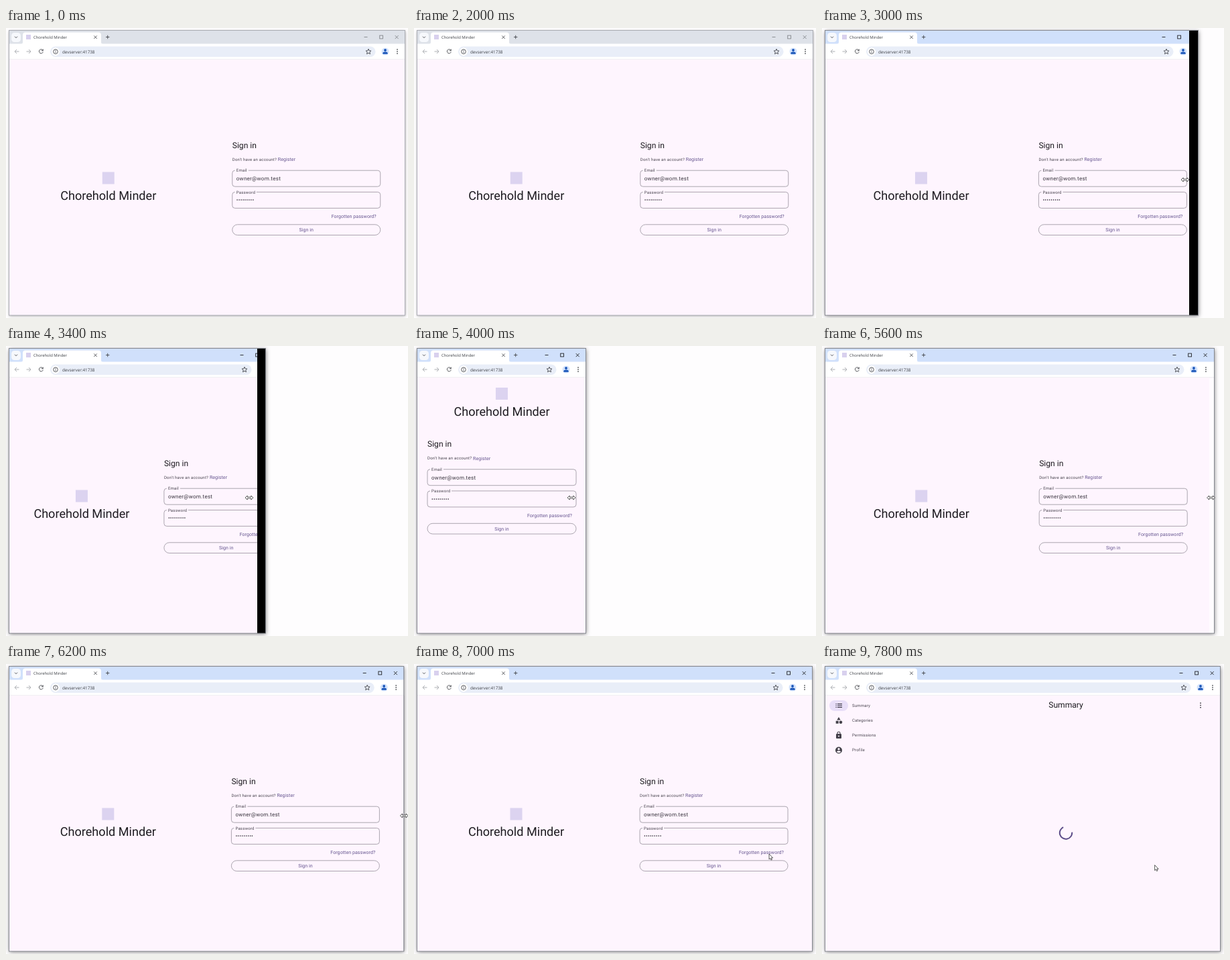
An HTML page that plays this animation: 600 by 432 pixels, repeating every 8000 ms.

```html
<!DOCTYPE html>
<html lang="en">
<head>
<meta charset="utf-8">
<title>Resizable sign-in</title>
<style>
  html, body { margin: 0; width: 100%; height: 100%; overflow: hidden; background: #fefdfe; }
  #stage { display: block; width: 600px; height: 432px; }
  text { font-family: Roboto, sans-serif; fill: #1d1b20; white-space: pre; text-rendering: geometricPrecision; }
  .ui text { font-family: "Open Sans", sans-serif; fill: #3c3f45; }
  .h1 { font-size: 18.1px; text-anchor: middle; }
  .h2 { font-size: 12.1px; }
  .small { font-size: 6.05px; letter-spacing: .2px; fill: #49454f; }
  .input { font-size: 8.06px; letter-spacing: .25px; fill: #3a363f; }
  .link { font-size: 7.06px; letter-spacing: .05px; fill: #65558f; }
  .end { text-anchor: end; }
  .mid { text-anchor: middle; }
  .box { fill: none; stroke: #97929c; stroke-width: .8; }
  .page { fill: #fef5fe; }
  .icon { fill: none; stroke: #44474c; stroke-width: .9; }
  .pale { stroke: #a4a7ac; }
  .solid { fill: #44414a; }
  #shade { filter: drop-shadow(0 1px 3px rgba(0, 0, 0, .5)); }
  #frame { fill: none; stroke: #85888f; stroke-width: 1; }
  #title { fill: #d0e0fb; }
  #sysButtons { stroke: #202124; }
  .idle #title { fill: #dee2e9; }
  .idle #sysButtons { stroke: #83868b; }
  .idle #shade { filter: drop-shadow(0 1px 2px rgba(0, 0, 0, .35)); }
  .idle #frame { stroke: #a9abb2; }
  #button.hover { fill: #f3eaf9; }
  .pointer { fill: #fff; stroke: #333; stroke-width: .8; stroke-linejoin: round; }
</style>
</head>
<body>
<svg id="stage" viewBox="0 0 600 432">
  <rect id="shade" x="5" y="4" height="424"/>
  <svg id="pane" width="600" height="428">
    <rect x="5" y="4" width="600" height="424" fill="#fffcff"/>

    <g class="ui">
      <rect id="title" x="5" y="4" width="600" height="20"/>
      <rect x="8" y="7" width="14" height="14" rx="4.5" fill="#f6f8fc"/>
      <path class="icon" d="M13 12.7l2 2 2-2"/>
      <path d="M22 24q3 0 3-3V10.500q0-4 4-4H138q4 0 4 4V21q0 3 3 3z" fill="#fff"/>
      <rect x="30" y="10" width="7" height="7" fill="#d8d0ee"/>
      <text x="41" y="16" font-size="5.9">Chorehold Minder</text>
      <path class="icon" d="M131.300 11.500l4.400 4.400m0-4.400l-4.400 4.400M149 13.500h5.400M151.700 10.800v5.400"/>
      <rect x="5" y="23.500" width="600" height="23" fill="#fff"/>
      <rect x="5" y="46.500" width="600" height=".8" fill="#e6e3ea"/>
      <path class="icon pale" d="M19.500 35H13m3-3l-3 3 3 3M30.500 35H37m-3-3l3 3-3 3"/>
      <path class="icon" d="M55 33.300a3 3 0 1 0 .3 2.300M55.300 31.500v2.300H53"/>
      <rect id="address" x="66" y="27.500" height="15.500" rx="7.700" fill="#e9eef8"/>
      <circle cx="74" cy="35.200" r="6" fill="#fff"/>
      <circle class="icon" cx="74" cy="35.200" r="3.300" stroke-width=".8"/>
      <path class="icon" d="M74 34.800v2M74 33.100v.9" stroke-width=".8"/>
      <text x="84" y="37.500" font-size="6.3">devserver:41738</text>
      <g id="right">
        <g id="sysButtons" class="icon">
          <path d="M-61.500 13.500h5M-15.300 11.100l5 5m0-5l-5 5"/>
          <rect x="-38.300" y="11.100" width="4.800" height="4.800"/>
        </g>
        <path class="icon" stroke-linejoin="round" d="M-55 31.200l1.100 2.600 2.800.2-2.100 1.900.7 2.800-2.500-1.500-2.500 1.500.7-2.800-2.100-1.900 2.800-.2z"/>
        <circle cx="-30" cy="35" r="5.500" fill="#d3e3fd"/>
        <circle cx="-30" cy="33" r="1.900" fill="#1b56b8"/>
        <path d="M-33.700 38.700v-.8q0-2.300 3.700-2.300t3.700 2.300v.8z" fill="#1b56b8"/>
        <path d="M-12 31.300v7.600" stroke="#3c3f44" stroke-width="1.500" stroke-dasharray="1.500"/>
      </g>
    </g>

    <rect id="page" class="page" x="5" y="47.300" height="381"/>

    <g id="login">
      <g id="brand">
        <rect x="-9" y="214.500" width="18" height="18" fill="#dcd3f0"/>
        <text class="h1" y="256.300">Chorehold Minder</text>
      </g>
      <g id="form">
        <text class="h2" y="178.500">Sign in</text>
        <text class="small" y="197.700">Don't have an account?</text>
        <text class="link" x="68" y="198">Register</text>
        <rect class="box wide" y="212.200" height="24" rx="4"/>
        <rect class="page" x="4" y="211" width="20" height="3"/>
        <text class="small" x="6" y="214.300">Email</text>
        <text class="input" x="6" y="227">owner@wom.test</text>
        <rect class="box wide" y="244.400" height="24" rx="4"/>
        <rect class="page" x="4" y="243" width="32" height="3"/>
        <text class="small" x="6" y="246.500">Password</text>
        <text class="input" x="6" y="259.200">•••••••••</text>
        <text id="forgot" class="link end" y="283.300">Forgotten password?</text>
        <rect id="button" class="box wide" y="292.800" height="15.700" rx="7.850"/>
        <text id="submit" class="link mid" y="303.200">Sign in</text>
      </g>
      <g id="stale">
        <path class="box" d="M0 212.200h6M0 236.200h6M0 244.400h6M0 268.400h6M0 292.800h6M0 308.500h6"/>
        <text class="link" x="1" y="283.300">w</text>
      </g>
    </g>

    <g id="home">
      <rect x="11" y="54" width="28" height="16" rx="8" fill="#e8def8"/>
      <path d="M23 59.500h7M23 62h7M23 64.500h7" stroke="#2b2735" stroke-width="1.200"/>
      <path d="M20.500 59.500h1.300M20.500 62h1.300M20.500 64.500h1.300" stroke="#2b2735" stroke-width="1.200"/>
      <path class="solid" d="M25 79l2.700 4.500h-5.400zM20.700 84.800h4v4h-4z"/>
      <circle class="solid" cx="28" cy="86.800" r="2.300"/>
      <rect class="solid" x="21" y="104" width="8" height="7" rx="1"/>
      <path d="M23 104.500v-1.500a2 2 0 0 1 4 0v1.500" fill="none" stroke="#44414a" stroke-width="1.100"/>
      <circle class="page" cx="25" cy="107.500" r="1"/>
      <circle class="solid" cx="25" cy="128.500" r="5"/>
      <circle class="page" cx="25" cy="126.700" r="1.600"/>
      <path class="page" d="M22 131q0-1.800 3-1.800t3 1.800q-3 2.600-6 0z"/>
      <text class="small" x="45" y="64.200">Summary</text>
      <text class="small" x="45" y="86.200">Categories</text>
      <text class="small" x="45" y="108.200">Permissions</text>
      <text class="small" x="45" y="130.200">Profile</text>
      <text class="h2 mid" x="364" y="65.300">Summary</text>
      <path d="M565 57.500v7.900" stroke="#36323b" stroke-width="1.600" stroke-dasharray="1.600"/>
      <path id="spinner" fill="none" stroke="#5c4c88" stroke-width="2"/>
    </g>
  </svg>
  <rect id="frame" x="4.500" y="3.500" height="424.500"/>
  <path id="resize" class="pointer" d="M-6 0l3.200-3v2h5.600v-2L6 0 2.800 3V1h-5.600v2z"/>
  <path id="arrow" class="pointer" d="M0 0v8l1.800-1.600 1.200 2.600 1.400-.7-1.200-2.500h2.400z"/>
</svg>

<script>
const LOOP = 8000, STEP = 200;
const $ = id => document.getElementById(id);
const set = (el, attrs) => { for (const k in attrs) el.setAttribute(k, attrs[k]); };
const move = (id, x, y = 0) => set($(id), { transform: `translate(${x} ${y})` });
const show = (id, on) => { $(id).style.display = on ? "" : "none"; };

// [time, value...] points, linear in between
const edgeKeys = [
  [2600, 596], [2800, 590], [3000, 562], [3200, 480], [3400, 388], [3600, 312], [3800, 257],
  [4400, 257], [4600, 285], [4800, 372], [5000, 466], [5200, 540], [5400, 567], [5600, 586],
  [5800, 593], [6000, 594.2], [6400, 594.2], [6600, 595]
];
const pointerKeys = [
  [2400, 598, 228], [2600, 595, 226], [2800, 580, 226], [3000, 542, 226], [3200, 456, 226],
  [3400, 363, 226], [3600, 288, 226], [3800, 240, 226], [4000, 235, 226], [4200, 235, 226],
  [4400, 247, 226], [4600, 300, 226], [4800, 386, 226], [5000, 476.7, 226], [5200, 546, 226],
  [5400, 569, 226], [5800, 592, 226], [6000, 594.3, 226], [6600, 594.3, 226], [6800, 584, 238],
  [7000, 530, 283], [7200, 496.6, 299.500]
];

function at(keys, t) {
  const i = keys.findIndex(k => k[0] > t);
  if (i === 0) return keys[0].slice(1);
  if (i < 0) return keys[keys.length - 1].slice(1);
  const a = keys[i - 1], b = keys[i], f = (t - a[0]) / (b[0] - a[0]);
  return a.slice(1).map((v, n) => v + (b[n + 1] - v) * f);
}
const edgeAt = t => at(edgeKeys, t)[0];

function layoutForm(right) {
  const w = right - 5, half = w / 2, wide = w > 426;
  const size = wide ? Math.min(221, half - 30) : w - 30;
  const left = wide ? 5 + half + (half - size) / 2 : 20;
  move("brand", 5 + (wide ? w / 4 : half), wide ? 0 : -152.5);
  move("form", left, wide ? 0 : -28.5);
  document.querySelectorAll(".wide").forEach(el => set(el, { width: size }));
  set($("forgot"), { x: size - 6 });
  set($("submit"), { x: size / 2 });
}

function drawSpinner(t) {
  const r = 9.2, rest = 7800 - t;
  const from = -5 - rest * .3, to = from + 250 - rest * .35;
  const point = deg => {
    const a = deg * Math.PI / 180;
    return `${364 + r * Math.cos(a)} ${251.5 + r * Math.sin(a)}`;
  };
  const large = to - from > 180 ? 1 : 0;
  set($("spinner"), { d: `M${point(from)}A${r} ${r} 0 ${large} 1 ${point(to)}` });
}

function render(t) {
  // Toolbar and page lag behind the dragged window edge.
  const shrinking = t < 4100;
  const edge = edgeAt(t);
  const chrome = edgeAt(t - (shrinking ? 50 : 11));
  const page = edgeAt(t - (shrinking ? 106 : 85));
  const painted = shrinking ? edgeAt(t + 34) : edge;

  $("stage").classList.toggle("idle", t < 2600);
  set($("shade"), { width: edge - 5 });
  set($("frame"), { width: edge - 5 });
  set($("pane"), { width: painted });
  set($("address"), { width: chrome - 44.5 - 66 });
  set($("page"), { width: page - 5 });
  move("right", chrome);
  layoutForm(page);
  move("stale", chrome - 1);
  show("stale", !shrinking && edge - page > 38 && page < 431);

  const home = t >= 7400;
  show("login", !home);
  show("home", home);
  drawSpinner(t);
  $("button").classList.toggle("hover", t >= 7200);

  const [x, y] = at(pointerKeys, t);
  show("resize", t >= 2400 && t < 6800);
  show("arrow", t >= 6800);
  move("resize", x, y);
  move("arrow", x, y);
}

function tick() {
  const t = performance.now() % LOOP;
  render(Math.floor(t / STEP) * STEP);
  requestAnimationFrame(tick);
}
tick();
</script>
</body>
</html>
```
